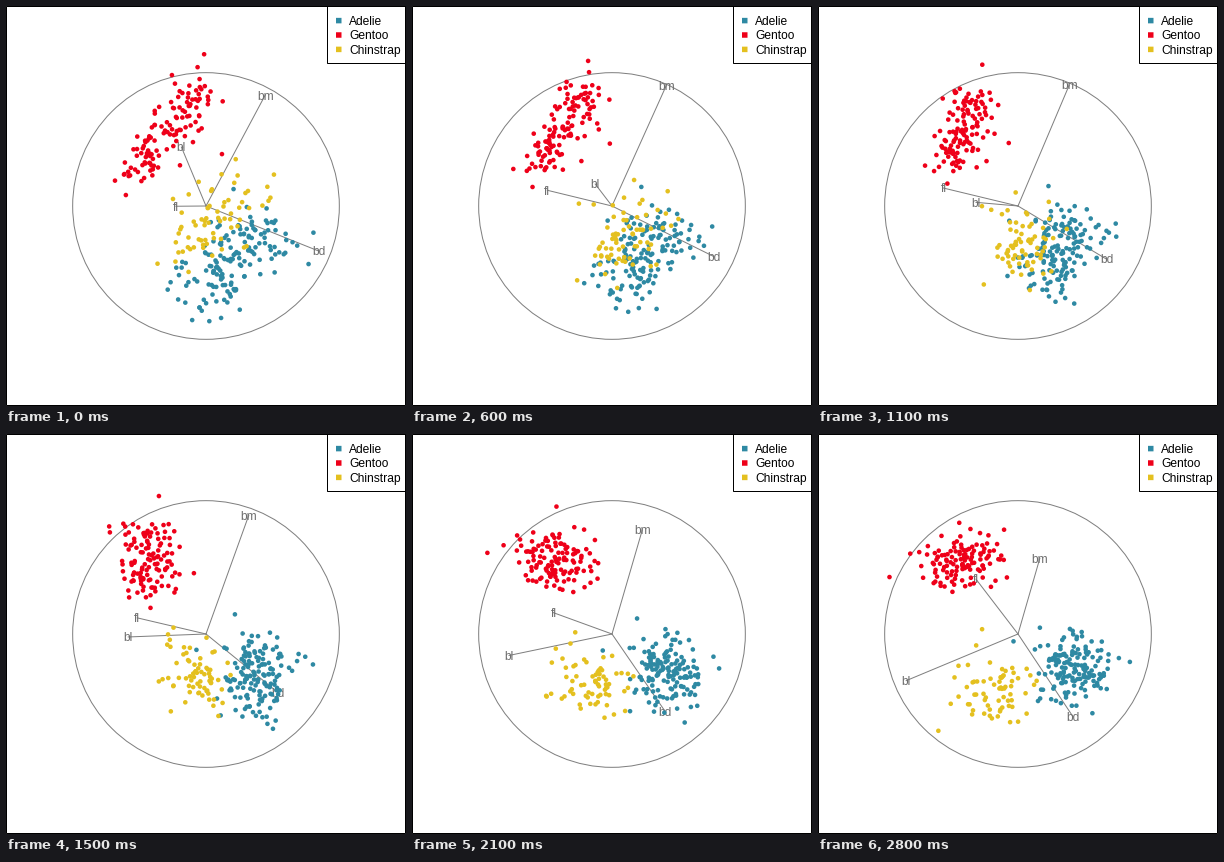
Write a matplotlib script that moves like this. It is 400 px wide and 400 px high and loops after 2900 ms.

```python
import numpy as np
import matplotlib.pyplot as plt
from matplotlib.animation import FuncAnimation
from matplotlib.patches import Circle, Rectangle

SIZE, MID = 400, 200
RADIUS = SIZE / 3
PX = 0.72  # points per pixel at 100 dpi
FRAMES, STEP = 29, 100
LINE, INK = "#7f7f7f", "#6f6f6f"
LABELS = ["bl", "bd", "fl", "bm"]

# Overall mean and spread of bill length, bill depth, flipper length, body mass
MEAN = np.array([43.92, 17.15, 200.9, 4201.8])
SD = np.array([5.46, 1.975, 14.06, 802.0])

# Per species: mean, half the male-female gap, spread within a sex, shared
# correlation, and a few birds that stand apart from the cloud
SPECIES = {
    "Adelie": dict(
        color="#2e89a3", n=151, mean=[38.8, 18.35, 190, 3700],
        gap=[1.6, 0.73, 2.3, 337], spread=[2.2, 0.97, 6.1, 312], rho=0.2,
        apart=[(34.6, 21.1, 198, 4400), (33.1, 16.1, 178, 2900),
               (44.1, 18.0, 210, 4000), (42.9, 17.6, 196, 4700)]),
    "Gentoo": dict(
        color="#ee0019", n=123, mean=[47.5, 15.0, 217, 5076],
        gap=[1.95, 0.74, 4.4, 402], spread=[2.3, 0.65, 4.8, 290], rho=0.37,
        apart=[(59.6, 17.0, 230, 6050), (49.2, 15.2, 221, 6300),
               (54.3, 15.7, 231, 5650), (44.4, 17.3, 219, 5250),
               (42.7, 13.7, 208, 3950)]),
    "Chinstrap": dict(
        color="#e4c01f", n=68, mean=[48.8, 18.4, 196, 3733],
        gap=[1.76, 0.83, 4.1, 206], spread=[2.4, 0.77, 5.9, 325], rho=0.4,
        apart=[(58.0, 17.8, 181, 3700), (46.9, 16.6, 192, 2700),
               (52.0, 20.7, 210, 4800)]),
}

# Step at which the tour bends, and the axis tips there in pixels
PATH = {
    0: [(175, 141), (313, 246), (170, 200), (258, 90)],
    8: [(186, 191), (299, 250), (123, 180), (255, 78)],
    15: [(122, 203), (272, 258), (131, 184), (243, 82)],
    19: [(99, 212), (254, 268), (139, 183), (232, 88)],
    24: [(94, 235), (252, 289), (145, 173), (228, 111)],
    28: [(88, 247), (255, 283), (158, 145), (222, 124)],
}


def simulate(rng, n, mean, gap, spread, rho, apart, **_):
    """Draw a two-sex cloud of n birds and return it standardised."""
    k = n - len(apart)
    shared = rng.normal(size=(k, 1))
    noise = np.sqrt(rho) * shared + np.sqrt(1 - rho) * rng.normal(size=(k, 4))
    noise = np.clip(noise - noise.mean(axis=0), -2.3, 2.3)
    sex = np.where(np.arange(k) % 2, 1, -1)[:, None]
    cloud = np.array(mean) + sex * np.array(gap) + noise * np.array(spread)
    return (np.vstack([cloud, apart]) - MEAN) / SD


def basis(i):
    """Orthonormal 4x2 projection at step i, y pointing down."""
    flat = np.reshape(list(PATH.values()), (len(PATH), -1))
    tips = [np.interp(i, list(PATH), col) for col in flat.T]
    u, _, vt = np.linalg.svd((np.reshape(tips, (4, 2)) - MID) / RADIUS,
                             full_matrices=False)
    return u @ vt


def box(x, y, w, h, **style):
    ax.add_patch(Rectangle((x, y), w, h, snap=False, **style))


rng = np.random.default_rng(7)
data = np.vstack([simulate(rng, **s) for s in SPECIES.values()])
colors = np.repeat([s["color"] for s in SPECIES.values()],
                   [s["n"] for s in SPECIES.values()])
scale = MID / np.linalg.norm(data, axis=1).max()

fig = plt.figure(figsize=(4, 4), dpi=100, facecolor="white")
ax = fig.add_axes([0, 0, 1, 1])
ax.set_xlim(0, SIZE)
ax.set_ylim(SIZE, 0)
ax.axis("off")

font = dict(family="Liberation Sans", fontsize=12 * PX, va="baseline")
ax.add_patch(Circle((MID, MID), RADIUS, fill=False, ec=LINE, lw=PX, zorder=1))
spokes = [ax.plot([], [], color=LINE, lw=PX, snap=False, zorder=1)[0]
          for _ in LABELS]
names = [ax.text(0, 0, s, color=INK, ha="center", zorder=2, **font)
         for s in LABELS]
dots = ax.scatter(np.zeros(len(data)), np.zeros(len(data)), c=colors,
                  s=(4.6 * PX) ** 2, linewidths=0, zorder=3)

# Frame and legend
box(0.5, 0.5, 399, 399, fill=False, ec="black", lw=PX, zorder=6)
box(321.5, 0.5, 78, 57, fc="white", ec="black", lw=PX, zorder=4)
for row, (name, s) in enumerate(SPECIES.items()):
    y = 14.6 + 14.4 * row
    box(330, y - 2.75, 5.5, 5.5, fc=s["color"], lw=0, zorder=5)
    ax.text(343, y + 4.4, name, color="black", ha="left", zorder=5, **font)


def draw(i):
    proj = basis(i)
    dots.set_offsets(MID + scale * data @ proj)
    for (x, y), spoke, name in zip(MID + RADIUS * proj, spokes, names):
        spoke.set_data([MID, x], [MID, y])
        name.set_position((x, y + 4.3))
    return [dots, *spokes, *names]


anim = FuncAnimation(fig, draw, frames=FRAMES, interval=STEP, repeat=True,
                     repeat_delay=0, blit=False)
plt.show()
```
